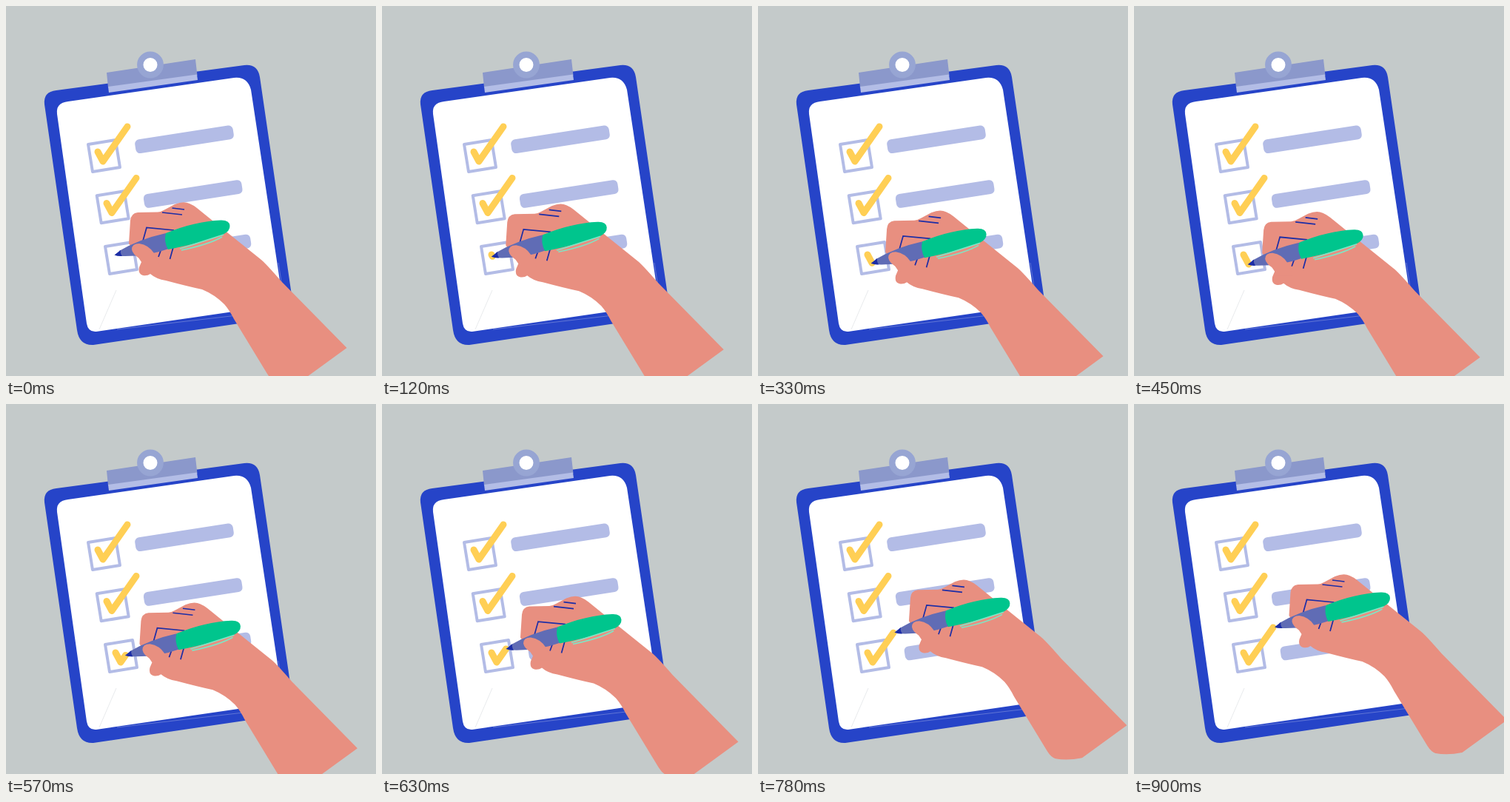
These frames come from a looping animation (500x500 px, 1530 ms). An HTML page:

```html
<!DOCTYPE html>
<html lang="en">
<head>
<meta charset="utf-8">
<title>Checklist</title>
<style>
  html, body { margin: 0; width: 100%; height: 100%; overflow: hidden; background: #c4caca; }
  svg { display: block; width: 100%; height: 100%; }
  .tick { fill: none; stroke: #ffcf55; stroke-width: 9; stroke-linecap: round; stroke-linejoin: round; }
  .box { fill: none; stroke: #b3bce6; stroke-width: 4; stroke-linejoin: round; }
  .bar { fill: #b3bce6; }
  .skin { fill: #e88f80; }
  .ink { fill: none; stroke: #1c2da6; stroke-width: 1.7; }
  .thin { fill: none; stroke-width: .6; }
</style>
</head>
<body>
<svg viewBox="0 0 500 500">
  <defs>
    <g id="row">
      <path class="box" d="M111 187 148 181 154 218 117 224Z"/>
      <rect class="bar" x="-67" y="-9.5" width="134" height="19" rx="6" transform="translate(241 180.3) rotate(-8.8)"/>
    </g>
    <path id="tick" class="tick" d="M124 197 131 210 164 163"/>
  </defs>

  <!-- clipboard -->
  <path fill="#2644c8" d="M52 133Q50 116 68 114L322 80Q340 78 343 96L390 418 118 458Q99 459 96 438Z"/>
  <path fill="#fff" d="M69 146Q67 131 84 129L308 97Q326 95 331 113L373 391Q374 402 362 405L122 440Q111 441 109 429Z"/>
  <path class="thin" stroke="#8796de" d="M150 437 372 411M368 347 374 385"/>
  <path class="thin" stroke="#d9dce0" d="M149 384 126 437"/>
  <path fill="#8b98cb" d="M136 90 256 72 258.500 94 138 110Z"/>
  <path fill="#b3bde6" d="M138 109 258 92.500 259 100 139 117Z"/>
  <circle cx="195" cy="79.500" r="13.700" fill="#fff" stroke="#97a5d3" stroke-width="8.400"/>

  <!-- list -->
  <use href="#row"/>
  <use href="#row" x="11.700" y="69.300" id="row2"/>
  <use href="#row" x="23" y="138" id="row3"/>
  <use href="#tick"/>
  <use href="#tick" x="12" y="69.500"/>
  <path id="live" class="tick"/>

  <g id="hand">
    <path class="skin" d="M168 290Q169 280 178 279L205 278.500Q210 278 214 275.500L228 268Q240 263 248 267
      Q253 269 258 273L279 290 345 343Q352 349 372 372L460.500 462 400 506Q380 510 364 507Q358 505 353 497
      L308 423Q302 411 295 403Q282 390 265 383Q246 379 216 371Q203 369 195 362Q191 365 185 364
      Q178 362 180 353L183 346 166 321Z"/>
    <path class="ink" d="M211 279 238 282M224.500 273 241 275M184 321 190 299.500 227 303M210 328 206 339M226 326 221.500 342"/>
    <path fill="#606cb5" d="M153 331Q180 315 216 307L220 328Q190 339 155 338Z"/>
    <path fill="#1c2da6" d="M146.500 336.500 155 329.700Q154 334 157 338Q151 338.500 146.500 336.500Z"/>
    <path fill="#00c58d" d="M216 307Q255 291 290 289.500Q302 289 302.500 297Q303 304 293 309Q265 320 219 329Q213 318 216 307Z"/>
    <path fill="none" stroke="#7fe6c6" stroke-width="1.600" d="M235 328 294 309M237 330Q275 322 292 312"/>
    <path class="skin" d="M170 329Q170 321 180 321Q193 323 200 334L208 352 185 352Q188 346 182 342Q171 336 170 329Z"/>
  </g>
</svg>
<script>
  const byId = id => document.getElementById(id);

  // The bars are spaced a little wider than the boxes
  for (const [id, dx, dy] of [["row2", 0, 4.4], ["row3", .5, 9.2]]) {
    const use = byId(id);
    const copy = byId("row").cloneNode(true);
    copy.removeAttribute("id");
    copy.setAttribute("transform", `translate(${use.getAttribute("x")} ${use.getAttribute("y")})`);
    const bar = copy.querySelector("rect");
    bar.setAttribute("transform", `translate(${dx} ${dy}) ` + bar.getAttribute("transform"));
    use.replaceWith(copy);
  }

  const LOOP = 1530, STEP = 30, TURN = 430, END = 900;

  function ease(t, from, to) {
    const p = Math.min(1, Math.max(0, (t - from) / (to - from)));
    return (1 - Math.cos(Math.PI * p)) / 2;
  }

  function draw(t) {
    const down = ease(t, 0, TURN), up = ease(t, TURN, END);
    const x = 7 * down + 36.5 * up, y = 13 * down - 48 * up;
    byId("hand").setAttribute("transform", `translate(${x} ${y})`);

    let d = "";
    if (down > 0) d = `M148 336L${148 + 7 * down} ${336 + 13 * down}`;
    if (up > 0) d += `L${155 + 33 * up} ${349 - 47 * up}`;
    byId("live").setAttribute("d", d);
  }

  const start = performance.now();
  function tick() {
    const t = (performance.now() - start) % LOOP;
    draw(Math.min(END, Math.floor(t / STEP) * STEP));
    requestAnimationFrame(tick);
  }
  tick();
</script>
</body>
</html>
```
